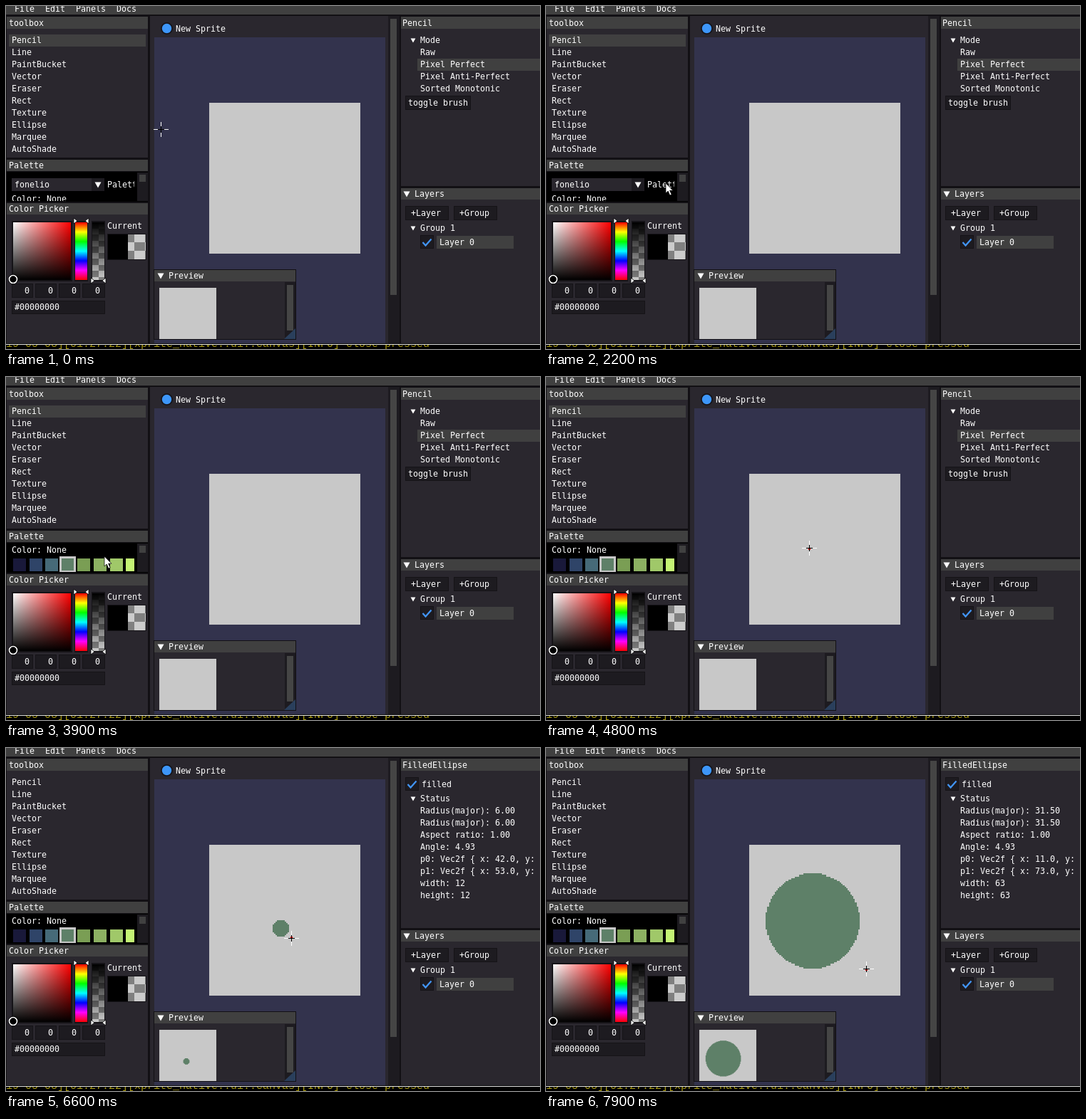
These frames come from a looping animation (749 by 482 pixels, 8 s). An HTML page:

```html
<!DOCTYPE html>
<html lang="en">
<head>
<meta charset="utf-8">
<title>Sprite editor</title>
<style>
html, body { margin: 0; width: 100%; height: 100%; overflow: hidden; background: #121014; }
svg { display: block; shape-rendering: crispEdges; }
text { fill: #fff; font: 11.63px "DejaVu Sans Mono", monospace; white-space: pre; }
.panel { fill: #2a272e; }
.bar { fill: #404040; }
.field { fill: #1d1b20; stroke: #151317; }
.frame { fill: #2a272e; }
.tri { fill: #fff; shape-rendering: auto; }
.smooth { shape-rendering: auto; }
.tick { fill: none; stroke: #4296fa; stroke-width: 2.2; shape-rendering: auto; }
.log { fill: #a89a12; font-size: 15px; font-family: "Liberation Mono", monospace; }
</style>
</head>
<body>
<svg width="749" height="482" viewBox="0 0 749 482">
  <defs>
    <linearGradient id="sat"><stop stop-color="#fff"/><stop offset="1" stop-color="#f00"/></linearGradient>
    <linearGradient id="dark" x2="0" y2="1"><stop stop-opacity="0"/><stop offset="1"/></linearGradient>
    <linearGradient id="fade" x2="0" y2="1"><stop/><stop offset="1" stop-opacity="0"/></linearGradient>
    <linearGradient id="hue" x2="0" y2="1">
      <stop stop-color="#f00"/><stop offset=".167" stop-color="#ff0"/><stop offset=".333" stop-color="#0f0"/>
      <stop offset=".5" stop-color="#0ff"/><stop offset=".667" stop-color="#00f"/>
      <stop offset=".833" stop-color="#f0f"/><stop offset="1" stop-color="#f00"/>
    </linearGradient>
    <pattern id="check" width="17" height="17" patternUnits="userSpaceOnUse" x="121" y="304">
      <path fill="#ccc" d="M0 0h17v17h-17z"/><path fill="#808080" d="M0 0h8.500v8.500h-8.500zM8.500 8.500h8.500v8.500h-8.500z"/>
    </pattern>
    <pattern id="check2" width="24" height="24" patternUnits="userSpaceOnUse" x="171" y="320">
      <path fill="#ccc" d="M0 0h24v24h-24z"/><path fill="#808080" d="M0 0h9v12h-9zM9 12h15v12h-15z"/>
    </pattern>
    <clipPath id="palClip"><path d="M8 234h172v40h-172z"/></clipPath>
    <clipPath id="preClip"><path d="M209 388h182v80h-182z"/></clipPath>
    <clipPath id="infoClip"><path d="M553 33h188v220h-188z"/></clipPath>
    <clipPath id="logClip"><path d="M0 476h749v6h-749z"/></clipPath>
    <path id="down" d="M-4.5 -3.5h9l-4.5 8z"/>
    <path id="tick" d="M-6 0l4 4.500l8 -9"/>
    <path id="blob"/>
  </defs>

  <!-- menu -->
  <rect class="bar" width="749" height="12"/>
  <text x="12" y="8">File</text><text x="55" y="8">Edit</text>
  <text x="98" y="8">Panels</text><text x="155" y="8">Docs</text>

  <!-- left column -->
  <path class="panel" d="M1 15h198v198h-198zM1 277h198v197h-198z"/>
  <path class="bar" d="M1 15h198v17h-198zM1 216h198v16h-198zM1 277h198v16h-198z"/>
  <text x="4" y="28">toolbox</text>
  <rect id="picked" class="bar" x="4" y="40" width="192" height="17"/>
  <g id="tools"></g>
  <text x="4" y="228">Palette</text>
  <rect x="1" y="233" width="198" height="42"/>
  <g clip-path="url(#palClip)"><g id="pal">
    <path class="frame" d="M8 242h130v18h-130z"/>
    <path fill="#1d1b20" d="M120 242h18v18h-18z"/>
    <use href="#down" class="tri" x="129" y="251"/>
    <text x="12" y="255">fonelio</text>
    <text x="142" y="255">Palette</text>
    <text x="8" y="275">Color: None</text>
    <g id="swatches"></g>
    <rect id="chosen" y="281.500" width="20" height="20" fill="none" stroke="#c8c8c8" stroke-width="3"/>
  </g></g>
  <path fill="#1d1b20" d="M184 234h15v40h-15z"/>
  <rect id="grab" x="187" y="237" width="9" height="10" fill="#404040"/>

  <text x="4" y="289">Color Picker</text>
  <path fill="#151317" d="M8 302h85v85h-85zM96 302h19v85h-19zM120 302h19v85h-19zM142 320h55v37h-55z"/>
  <path fill="url(#sat)" d="M10 304h81v81h-81z"/>
  <path fill="url(#dark)" d="M10 304h81v81h-81z"/>
  <path fill="url(#hue)" d="M97 304h17v81h-17z"/>
  <path fill="url(#check)" d="M121 304h17v81h-17z"/>
  <path fill="url(#fade)" d="M121 304h17v81h-17z"/>
  <path class="tri" stroke="#000" stroke-width=".8" d="M95 298l5 4l-5 4zM116 298l-5 4l5 4zM119 382l5 4l-5 4zM140 382l-5 4l5 4z"/>
  <g class="smooth" fill="none"><circle cx="10" cy="384" r="5.500" fill="#000" stroke="#000" stroke-width="3"/><circle cx="10" cy="384" r="5.500" stroke="#fff" stroke-width="1.600"/></g>
  <text x="142" y="313">Current</text>
  <path d="M143 321h28v35h-28z"/><path fill="url(#check2)" d="M171 321h25v35h-25z"/>
  <g id="channels"></g>
  <rect class="field" x="8.500" y="414.500" width="130" height="18"/>
  <text x="12" y="427">#00000000</text>

  <!-- canvas -->
  <path class="panel" d="M202 14h350v460h-350z"/>
  <path fill="#1d1b20" d="M536 14h16v460h-16z"/>
  <path fill="#454545" d="M539 18h9v388h-9z"/>
  <g class="smooth"><circle cx="225.500" cy="31.500" r="8.500" fill="#17151a"/><circle cx="225.500" cy="31.500" r="6.700" fill="#3d96fa"/></g>
  <text x="238" y="36">New Sprite</text>
  <path fill="#33334d" d="M208 44h324v430h-324z"/>
  <path fill="#c8c8c8" d="M285 136h212v212h-212z"/>
  <use href="#blob" fill="#5e8068" transform="translate(285 136) scale(2.12)"/>

  <!-- preview -->
  <rect class="panel" x="207.500" y="370.500" width="199" height="98" stroke="#121014"/>
  <path class="bar" d="M208 371h198v16h-198z"/>
  <use href="#down" class="tri" x="217" y="379"/>
  <text x="228" y="383">Preview</text>
  <path fill="#1d1b20" d="M391 388h15v80h-15z"/>
  <path fill="#454545" d="M394 392h9v64h-9z"/>
  <path class="smooth" fill="#2a3f5c" d="M406 453v15h-16z"/>
  <g clip-path="url(#preClip)">
    <path fill="#c8c8c8" d="M215 396h80v80h-80z"/>
    <use href="#blob" class="smooth" fill="#5e8068" transform="translate(215 396) scale(.8)"/>
  </g>

  <!-- right column -->
  <path class="panel" d="M554 15h195v238h-195zM554 256h195v218h-195z"/>
  <path class="bar" d="M554 15h195v17h-195zM554 256h195v16h-195z"/>
  <text id="heading" x="556" y="28"></text>
  <g id="pencil">
    <path class="bar" d="M577 74h172v17h-172z"/>
    <use href="#down" class="tri" transform="translate(571 48) scale(.75)"/>
    <rect class="field" x="560.500" y="126.500" width="91" height="19"/>
    <text x="564" y="140">toggle brush</text>
  </g>
  <g id="ellipse">
    <rect class="field" x="560.500" y="41.500" width="18" height="18"/>
    <use href="#tick" class="tick" x="569.500" y="51"/>
    <text x="583" y="55">filled</text>
    <g id="status" clip-path="url(#infoClip)">
      <use href="#down" class="tri" transform="translate(571 71) scale(.75)"/>
      <text x="581" y="75">Status</text>
    </g>
  </g>
  <use href="#down" class="tri" x="562" y="264"/>
  <text x="573" y="268">Layers</text>
  <path class="field" d="M560.500 281.500h60v19h-60zM628.500 281.500h60v19h-60z"/>
  <text x="568" y="295">+Layer</text><text x="636" y="295">+Group</text>
  <use href="#down" class="tri" transform="translate(571 312) scale(.75)"/>
  <text x="581" y="316">Group 1</text>
  <rect class="field" x="581.500" y="322.500" width="18" height="18"/>
  <use href="#tick" class="tick" x="590.500" y="332"/>
  <path class="bar" d="M604 323h108v18h-108z"/>
  <text x="608" y="336">Layer 0</text>

  <!-- terminal -->
  <path d="M0 474h749v8h-749z"/>
  <path fill="#e8e8e8" d="M0 475h749v1h-749z"/>
  <text class="log" x="0" y="479" clip-path="url(#logClip)">19-05-03][01:27:22][xprite_native::ui::canvas][INFO] close pressed</text>

  <!-- pointers -->
  <g id="cross">
    <rect id="dot" width="3" height="3" fill="#f00"/>
    <path fill="#fff" d="M-10 0h6v1h-6zM5 0h6v1h-6zM0 -10h1v6h-1zM0 5h1v6h-1z"/>
    <path d="M-4 0h9v1h-9zM0 -4h1v9h-1z"/>
  </g>
  <path id="arrow" class="smooth" fill="#fff" stroke="#000" stroke-width=".7" d="M0 0v14l3.200 -3l2.600 6l2.400 -1l-2.600 -5.800h4.400z"/>
</svg>
<script>
const $ = id => document.getElementById(id);
const add = (parent, tag, attrs, label) => {
  const el = document.createElementNS("http://www.w3.org/2000/svg", tag);
  for (const k in attrs) el.setAttribute(k, attrs[k]);
  if (label) el.textContent = label;
  return $(parent).appendChild(el);
};
const list = (parent, x, y, labels) => labels.map((s, i) => add(parent, "text", { x, y: y + 17 * i }, s));

list("tools", 8, 52, ["Pencil", "Line", "PaintBucket", "Vector", "Eraser", "Rect", "Texture", "Ellipse", "Marquee", "AutoShade"]);
list("pencil", 581, 52, ["Mode", "Raw", "Pixel Perfect", "Pixel Anti-Perfect", "Sorted Monotonic"]);
const rows = list("status", 581, 92, Array(8).fill(" "));

const swatchX = i => Math.round(10 + i * 22.6);
["#19193a", "#2f4468", "#466a78", "#5e8068", "#7a9e54", "#8cb062", "#a0c869", "#c3f274"].forEach((fill, i) =>
  add("swatches", "rect", { x: swatchX(i), y: 283, width: 18, height: 18, fill }));

for (let i = 0; i < 4; i++) {
  add("channels", "rect", { class: "field", x: 8.5 + 33 * i, y: 390.5, width: i < 3 ? 29 : 31, height: 19 });
  add("channels", "text", { x: 26 + 33 * i, y: 404 }, "0");
}

// time, x, y
const pointer = [
  [0, 217, 173], [200, 219, 182], [500, 214, 215], [700, 208, 240], [800, 188, 247], [1100, 188, 247],
  [1300, 189, 250], [1400, 189, 250], [1500, 189, 248], [1900, 189, 248], [2200, 168, 249], [2600, 168, 249],
  [2900, 110, 258], [3100, 128, 250], [3300, 122, 255], [3500, 92, 260], [3600, 81, 264], [3700, 81, 264],
  [4100, 195, 240], [4400, 386, 228], [4600, 350, 240], [4700, 339, 243], [4800, 369, 240], [5200, 369, 240],
  [5800, 376, 241], [5900, 376, 241], [6000, 377, 240], [6100, 374, 243], [6800, 410, 277], [7100, 421, 290],
  [7700, 446, 307], [7800, 446, 307], [7900, 449, 310]
];
const scroll = [[1100, 0], [1300, 28], [1400, 28], [1500, 0], [2200, 0], [2400, 28]];
const corner = [[6100, 0], [6800, 16]];
const radius = [[6900, 19], [7100, 22], [7700, 30], [7900, 31.4]];

function at(keys, t) {
  const i = keys.findIndex(k => k[0] > t);
  if (i < 1) return (i ? keys[keys.length - 1] : keys[0]).slice(1);
  const a = keys[i - 1], b = keys[i], p = (t - a[0]) / (b[0] - a[0]);
  return a.slice(1).map((v, j) => v + (b[j + 1] - v) * p);
}

// outline of a pixelated ellipse
function outline(x, y, w, h) {
  const cx = x + w / 2, spans = [];
  for (let j = y; j < y + h; j++) {
    const v = (j + 0.5 - y - h / 2) / (h / 2);
    const half = w / 2 * Math.sqrt(1 - v * v);
    spans.push([j, Math.ceil(cx - half - 0.5), Math.floor(cx + half + 0.5)]);
  }
  if (!spans.length) return "";
  return `M${spans[0][1]} ${y}` + spans.map(s => `H${s[2]}V${s[0] + 1}`).join("") +
    spans.reverse().map(s => `H${s[1]}V${s[0]}`).join("") + "z";
}

const show = (id, on) => $(id).setAttribute("display", on ? "inline" : "none");
const move = (id, x, y) => $(id).setAttribute("transform", `translate(${x} ${y})`);

function drawShape(t) {
  const active = t >= 6200, centred = t >= 6900;
  show("status", active);
  if (!active) return $("blob").setAttribute("d", "");
  let p0 = 42, p1;
  if (centred) {
    const r = Math.floor(at(radius, t)[0]), lag = Math.floor(at(radius, t - 40)[0]);
    p0 = 42 - r;
    p1 = 42 + r;
    $("blob").setAttribute("d", outline(42 - lag, 50 - lag, 2 * lag, 2 * lag + 1));
  } else {
    const s = Math.round(at(corner, t)[0]);
    p1 = p0 + s;
    $("blob").setAttribute("d", outline(42, 50, s, s));
  }
  const w = p1 - p0 + 1, major = `Radius(major): ${(w / 2).toFixed(2)}`;
  const vec = (n, x) => `p${n}: Vec2f { x: ${x.toFixed(1)}, y:`;
  [major, major, "Aspect ratio: 1.00", "Angle: 4.93", vec(0, p0), vec(1, p1), `width: ${w}`, `height: ${w}`]
    .forEach((s, i) => rows[i].textContent = s);
}

function draw(now) {
  const t = Math.floor(now % 8000 / 100) * 100;
  const [x, y] = at(pointer, t).map(Math.round);
  const inCanvas = x >= 207;
  show("cross", inCanvas);
  show("arrow", !inCanvas);
  move(inCanvas ? "cross" : "arrow", x, y);

  const snap = (v, from) => from + Math.floor((v - from) / 2.12) * 2.12 - v;
  show("dot", inCanvas && x >= 285 && y >= 136);
  move("dot", snap(x, 285), snap(y, 136));

  const dy = Math.round(at(scroll, t)[0]);
  move("pal", 0, -dy);
  $("grab").setAttribute("fill", t >= 1000 && t < 2000 ? "#606060" : "#404040");
  const color = t < 2900 ? 0 : t < 3800 ? 4 : 3;
  show("chosen", t >= 2700);
  $("chosen").setAttribute("x", swatchX(color) - 1.5);

  const pencil = t < 5300;
  show("picked", pencil);
  show("pencil", pencil);
  show("ellipse", !pencil);
  $("heading").textContent = pencil ? "Pencil" : "FilledEllipse";
  drawShape(t);
}

const start = performance.now();
function loop() {
  draw(performance.now() - start);
  requestAnimationFrame(loop);
}
loop();
</script>
</body>
</html>
```
